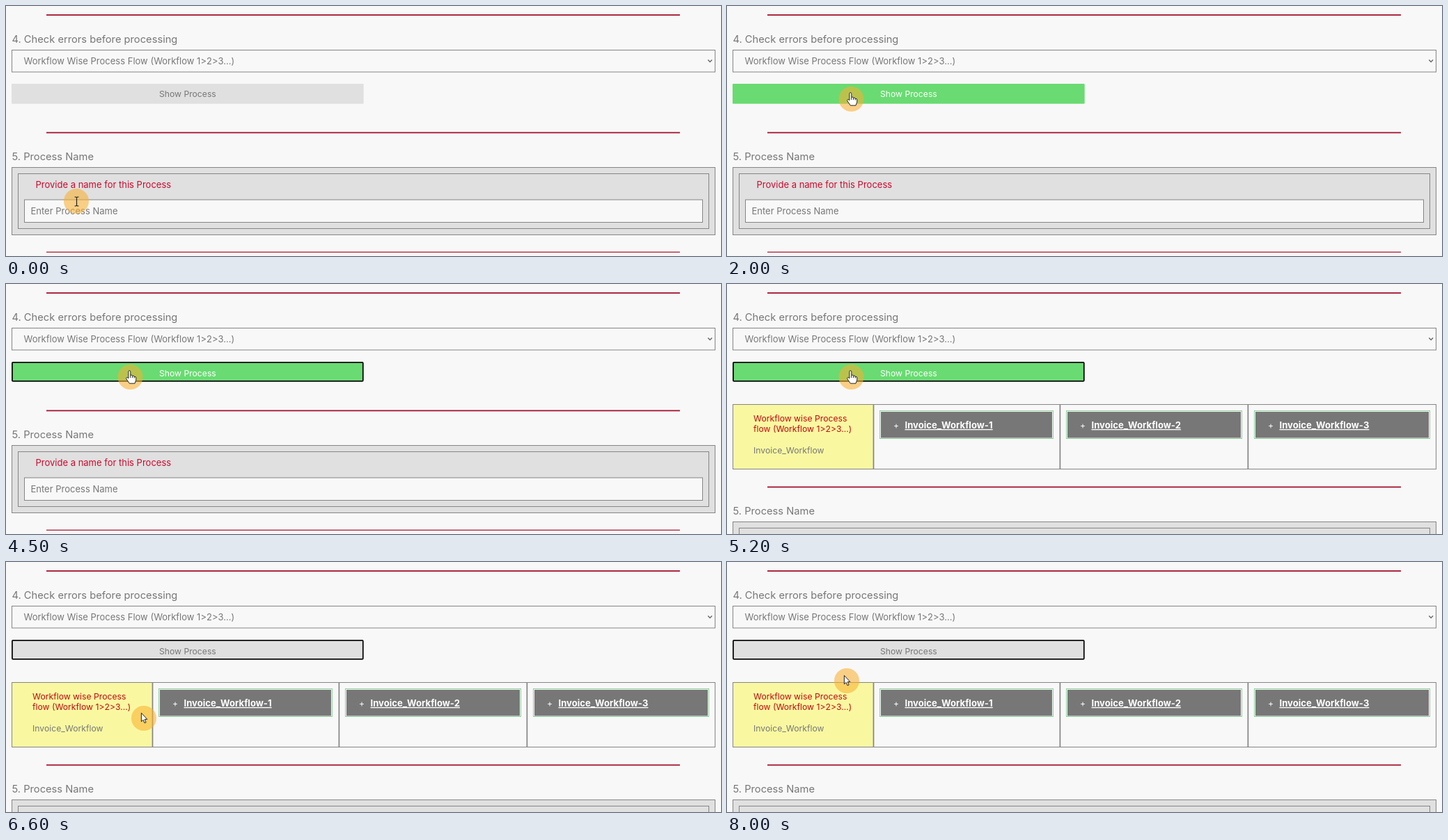
These frames come from a looping animation (1027 by 360 pixels, 8.1 s). An HTML page:

```html
<!DOCTYPE html>
<html lang="en">
<head>
<meta charset="utf-8">
<title>Show process</title>
<style>
  html, body { margin: 0; width: 100%; height: 100%; overflow: hidden; background: #f8f8f8; }
  svg { display: block; width: 1027px; height: 360px; }
  text { font: 13px Inter, sans-serif; fill: #777; white-space: pre; }
  .head { font-size: 14.7px; }
  .small { font-size: 12.2px; }
  .red { fill: #cb0a2c; }
  .dark { fill: #c4090d; }
  .white { fill: #fff; }
  .link { font-size: 13.1px; font-weight: 700; text-decoration: underline; }
  .rule { fill: #a5122f; }
  .box { fill: #f8f8f8; stroke: #858585; }
  .panel { fill: #e0e0e0; stroke: #858585; }
  .line { fill: none; stroke: #858585; }
  .pointer { fill: #fff; stroke: #222; stroke-linejoin: round; }
</style>
</head>
<body>
<svg viewBox="0 0 1027 360">
  <rect class="rule" x="58" y="12" width="910" height="1.8"/>
  <text class="head" x="8.5" y="53">4. Check errors before processing</text>
  <rect class="box" x="8.5" y="63.5" width="1010" height="31.5"/>
  <text x="25.5" y="84">Workflow Wise Process Flow (Workflow 1&gt;2&gt;3...)</text>
  <path d="M1008.3 77.6l2.9 2.9 2.9-2.9" fill="none" stroke="#666" stroke-width="1.4"/>

  <rect id="button" rx="1"/>
  <text id="label" class="small" text-anchor="middle">Show Process</text>
  <g id="progress">
    <rect id="bar" x="522" y="112" height="28.5" fill="#69db72"/>
    <text id="percent" class="white" x="523" y="131.5"></text>
  </g>

  <g id="result">
    <rect x="8.5" y="173.5" width="202" height="93" fill="#f9f8a1"/>
    <rect class="line" x="8.5" y="173.5" width="1010" height="93"/>
    <path class="line" stroke-width="1.7" d="M210.5 173.5v93M478.4 173.5v93M748.4 173.5v93"/>
    <text class="small dark" x="38" y="198">Workflow wise Process</text>
    <text class="small dark" x="38" y="213">flow (Workflow 1&gt;2&gt;3...)</text>
    <text class="small" x="38" y="244">Invoice_Workflow</text>
  </g>

  <g id="lower">
    <rect class="rule" x="58" y="181.5" width="910" height="1.8"/>
    <text class="head" x="8.5" y="222">5. Process Name</text>
    <rect class="panel" x="8.5" y="232.5" width="1010" height="97"/>
    <rect class="panel" x="17.5" y="241.5" width="992" height="79"/>
    <text class="red" x="42.5" y="262">Provide a name for this Process</text>
    <rect class="box" x="26.5" y="279" width="974" height="32.5"/>
    <text x="35.5" y="300">Enter Process Name</text>
    <rect class="rule" x="58" y="353.8" width="910" height="1.2"/>
  </g>

  <circle id="ripple" cx="178.5" cy="134" fill="none" stroke="#f5b53c" stroke-width="1.5"/>
  <g id="cursor">
    <circle r="18" fill="#fab030" fill-opacity=".57"/>
    <path id="beam" d="M-2.5-6H-.7L.5-5 1.7-6H3.5M.5-5V6M-2.5 7H-.7L.5 6 1.7 7H3.5" fill="none" stroke="#222" stroke-width="1.2"/>
    <path id="arrow" class="pointer" d="M-3.6-7.6V4.8L-.8 2.4 1.1 6.9 3.1 6 1.2 1.6H4.9Z"/>
    <g id="hand" class="pointer">
      <path d="M-2.6 2V-7.6Q-2.6-9.3-1.2-9.3T.3-7.6V-2.6Q2.7-3.6 3.2-1.8 5.3-2.4 5.8-.7 8.3-1 8.3 1.2V4.2L6.5 9.2H-1.2L-5.6 2.8Q-6.4 1-4.8.5-3.8.4-2.6 2Z"/>
      <path d="M.3-2.6V1M3.2-1.8V1.2M5.8-.7V1.5" fill="none"/>
    </g>
  </g>
</svg>
<script>
const LOOP = 8100, STEP = 100;
const PRESS = 2600, BAR_START = 3170, BAR_END = 4180, DONE = 5200;
// time, x, y
const PATH = [
  [450, 101, 281], [1100, 157.5, 206], [1800, 178.5, 134],
  [5650, 178.5, 134], [6600, 198, 225], [8000, 172, 171]
];

const $ = id => document.getElementById(id);
const set = (id, attrs) => {
  for (const name in attrs) $(id).setAttribute(name, attrs[name]);
};
const show = (id, on) => $(id).style.display = on ? '' : 'none';
const ramp = (t, from, to) => Math.min(1, Math.max(0, (t - from) / (to - from)));
const ease = u => u * u * (3 - 2 * u);
const mix = (a, b, u) => `rgb(${a.map((v, i) => Math.round(v + (b[i] - v) * u))})`;

function cursorAt(t) {
  let [, x, y] = PATH[0];
  for (let i = 1; i < PATH.length; i++) {
    const [t0, x0, y0] = PATH[i - 1], [t1, x1, y1] = PATH[i];
    const u = ease(ramp(t, t0, t1));
    x += (x1 - x0) * u;
    y += (y1 - y0) * u;
  }
  return [x, y];
}

function addCell(x, width, n) {
  $('result').insertAdjacentHTML('beforeend', `
    <rect x="${x + .5}" y="182.5" width="${width - 1}" height="40" fill="#f8f8f8" stroke="#8ed09b"/>
    <rect x="${x + 2}" y="184" width="${width - 4}" height="37.5" fill="#777"/>
    <text class="small white" x="${x + 20}" y="208">+</text>
    <text class="link white" x="${x + 36.5}" y="208">Invoice_Workflow-${n}</text>`);
}

function drawButton(t, busy) {
  const hover = ramp(t, 1650, 1950) - ramp(t, 5800, 6100);
  const focused = t > PRESS;
  const inset = focused ? .9 : 0;
  const width = busy ? 497.5 : 505.7;
  set('button', {
    x: 8 + inset, y: 112 + inset, width: width - 2 * inset, height: 28.7 - 2 * inset,
    fill: mix([224, 224, 224], [105, 219, 114], hover),
    stroke: focused ? '#0a0a0a' : 'none', 'stroke-width': 2 * inset
  });
  set('label', { x: 8 + width / 2, y: focused ? 132.6 : 131 });
  $('label').style.fill = mix([119, 119, 119], [255, 255, 255], hover);
}

function drawCursor(t) {
  const [x, y] = cursorAt(t);
  const onButton = y > 112 && y < 140.5;
  const onInput = t < DONE && y > 279;
  set('cursor', { transform: `translate(${x} ${y})` });
  show('beam', onInput);
  show('hand', onButton);
  show('arrow', !onInput && !onButton);

  const u = ramp(t, PRESS - 100, PRESS + 400);
  show('ripple', u > 0 && u < 1);
  set('ripple', { r: 18 + 13 * u, opacity: 1 - u });
}

function draw(t) {
  const busy = t >= BAR_START && t < BAR_END;
  const percent = Math.floor(100 * ramp(t, BAR_START, BAR_START + 1000));
  drawButton(t, busy);
  show('progress', busy);
  set('bar', { width: 4.97 * percent });
  $('percent').textContent = percent + '%';
  show('result', t >= DONE);
  set('lower', { transform: `translate(0 ${t >= DONE ? 110 : 0})` });
  drawCursor(t);
}

addCell(219, 250, 1);
addCell(487, 253, 2);
addCell(757, 253, 3);

const start = performance.now();
function tick() {
  const t = (performance.now() - start) % LOOP;
  draw(Math.floor(t / STEP) * STEP);
  requestAnimationFrame(tick);
}
tick();
</script>
</body>
</html>
```
